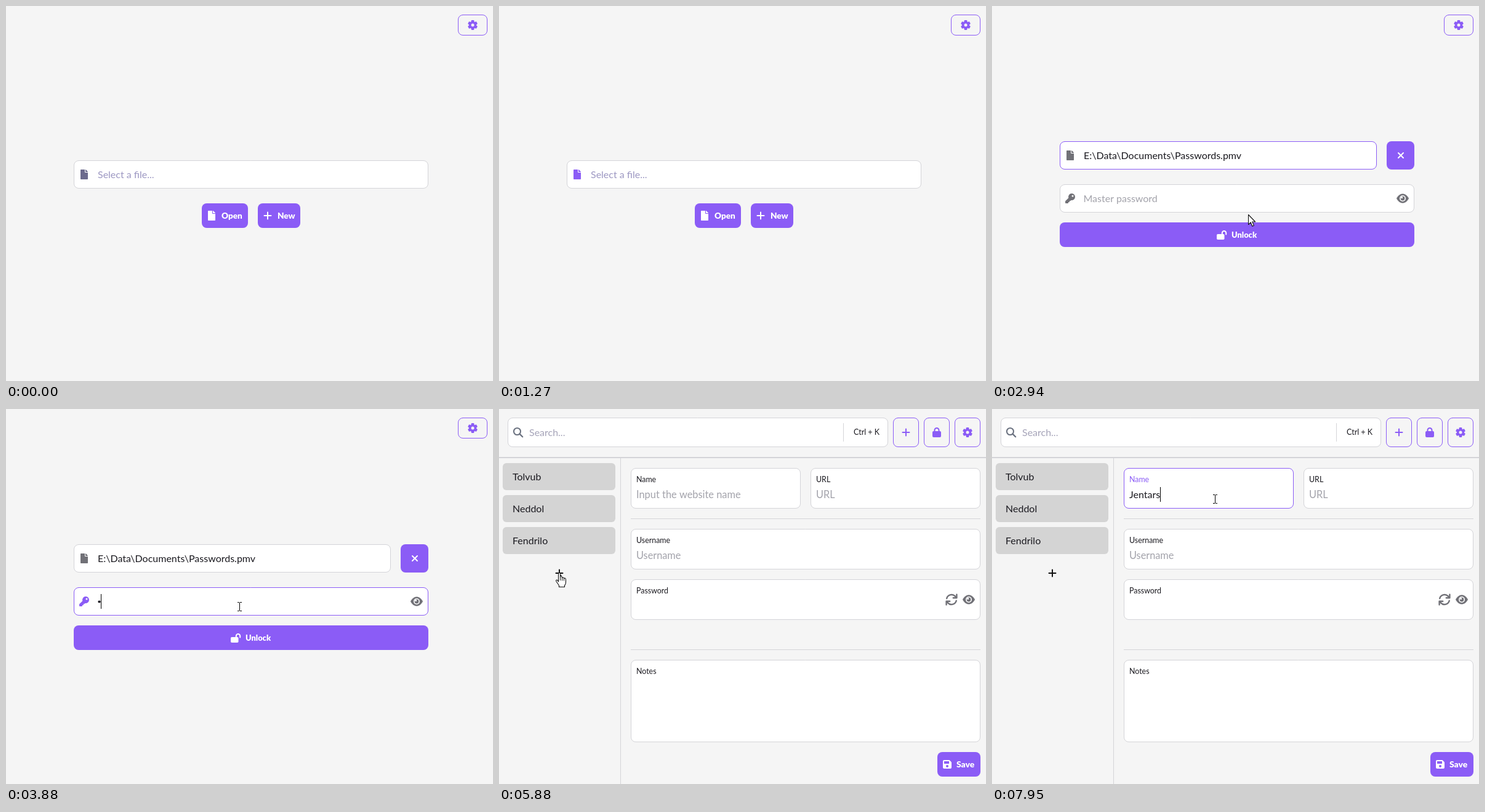
Animation of 791x610 px, one loop 8 s. Source, as an HTML page with a canvas:

```html
<!DOCTYPE html>
<html lang="en">
<head>
<meta charset="utf-8">
<title>Password vault</title>
<style>
html, body { margin: 0; width: 100%; height: 100%; overflow: hidden; background: #f5f5f5; }
canvas { display: block; width: 791px; height: 610px; }
</style>
</head>
<body>
<canvas id="stage"></canvas>
<script>
const LOOP = 8000, STEP = 66.8, W = 791, H = 610;
const BG = '#f5f5f5', PURPLE = '#8b5cf6', LINE = '#d4d4d8', INK = '#1b1a20';
const GRAY = '#717177', HINT = '#a3a3ab', WHITE = '#fff';
const canvas = document.getElementById('stage');
const g = canvas.getContext('2d');
const dpr = window.devicePixelRatio || 1;
canvas.width = W * dpr;
canvas.height = H * dpr;

const FILE = new Path2D('M224 136V0H24C11 0 0 11 0 24v464c0 13 11 24 24 24h336c13 0 24-11 24-24V160H248c-13 0-24-11-24-24zm160-14v6H256V0h6c6 0 13 3 17 7l98 98c5 4 7 11 7 17z');
const KEY = new Path2D('M512 176A176 176 0 0 1 303 349l-24 27a24 24 0 0 1-18 8h-37v40a24 24 0 0 1-24 24h-40v40a24 24 0 0 1-24 24H24a24 24 0 0 1-24-24v-78a24 24 0 0 1 7-17l162-162A176 176 0 1 1 512 176zM336 128a48 48 0 1 0 96 0a48 48 0 1 0-96 0z');
const ARROW = new Path2D('M.5.5V16.5L4.2 13 6.8 19.2 9.4 18.1 6.8 12H11.6Z');
const HAND = new Path2D('M-1.5 14V1.5Q-1.5-.5 0-.5T1.5 1.5V7Q2-.0 4.5 7.5Q6.5 6 7.5 8.5Q10.5 7 10.5 11V15Q10.5 18 8.5 20V22.5H-.5V20L-5 13.5Q-6 11-4 11Q-2.8 11-1.5 14');

function text(s, x, y, color = INK, size = 16, weight = 400) {
  g.font = `${weight} ${size}px Lato, "Open Sans", sans-serif`;
  g.fillStyle = color;
  g.fillText(s, x, y);
}

function fillBox(x, y, w, h, r, color) {
  g.fillStyle = color;
  g.beginPath();
  g.roundRect(x, y, w, h, r);
  g.fill();
}

function outline(x, y, w, h, border = LINE, fill = WHITE) {
  g.beginPath();
  g.roundRect(x + .5, y + .5, w - 1, h - 1, 7.5);
  g.fillStyle = fill;
  g.fill();
  g.strokeStyle = border;
  g.lineWidth = 1;
  g.stroke();
}

function rect(x, y, w, h, color) {
  g.fillStyle = color;
  g.fillRect(x, y, w, h);
}

function disc(x, y, r, color) {
  g.fillStyle = color;
  g.beginPath();
  g.arc(x, y, r, 0, Math.PI * 2);
  g.fill();
}

function stroke(path, color, width, cap = 'round') {
  g.strokeStyle = color;
  g.lineWidth = width;
  g.lineCap = cap;
  g.lineJoin = 'round';
  g.stroke(new Path2D(path));
}

function glyph(path, x, y, color) {
  g.save();
  g.translate(x, y);
  g.scale(1 / 32, 1 / 32);
  g.fillStyle = color;
  g.fill(path, 'evenodd');
  g.restore();
}

function plus(x, y, color) {
  const r = 5.5;
  stroke(`M${x - r} ${y}H${x + r}M${x} ${y - r}V${y + r}`, color, 2);
}

function gear(x, y) {
  g.save();
  g.translate(x, y);
  disc(0, 0, 6, PURPLE);
  for (let i = 0; i < 3; i++) {
    fillBox(-2.4, -8, 4.8, 16, 1.3, PURPLE);
    g.rotate(Math.PI / 3);
  }
  disc(0, 0, 2.5, BG);
  g.restore();
}

function eye(x, y) {
  g.fillStyle = GRAY;
  g.fill(new Path2D(`M${x - 10} ${y}C${x - 5} ${y - 10} ${x + 5} ${y - 10} ${x + 10} ${y}C${x + 5} ${y + 10} ${x - 5} ${y + 10} ${x - 10} ${y}Z`));
  disc(x, y, 5, WHITE);
  disc(x, y, 3.4, GRAY);
  disc(x - 1.4, y - 1.4, 1.5, WHITE);
}

function refresh(x, y) {
  g.save();
  g.translate(x, y);
  for (let i = 0; i < 2; i++) {
    stroke('M-7.8-1.8A8 8 0 0 1 5.7-5.6L8-3.2', GRAY, 2.4);
    stroke('M8.4-8.4V-2.8H2.8', GRAY, 2.4);
    g.rotate(Math.PI);
  }
  g.restore();
}

function lock(x, y) {
  fillBox(x - 7, y - 2, 14, 10, 2, PURPLE);
  stroke(`M${x - 3.5} ${y - 1}V${y - 3.5}A3.5 3.5 0 0 1 ${x + 3.5} ${y - 3.5}V${y - 1}`, PURPLE, 2, 'butt');
}

function startView(t) {
  outline(734, 14, 48, 34, PURPLE, BG);
  gear(758, 31);
  outline(110, 251, 576, 46);
  glyph(FILE, 121, 266, t >= 735 ? PURPLE : '#6c6b8d');
  text('Select a file...', 149, 280, '#9c97c2');
  fillBox(318, 321, 75, 40, 8, PURPLE);
  glyph(FILE, 328, 333, WHITE);
  text('Open', 350, 346, WHITE, 13.6, 900);
  fillBox(409, 321, 69, 40, 8, PURPLE);
  plus(425, 341, WHITE);
  text('New', 441, 346, WHITE, 13.6, 900);
}

const count = (times, t) => times.filter(k => t >= k).length;

function unlockView(t) {
  const focus = t >= 3150;
  const dots = count([3880, 3945, 4010, 4220, 4480, 4545, 4610, 4680], t);
  outline(734, 14, 48, 34, PURPLE, BG);
  gear(758, 31);
  outline(110, 220, 515, 46, t >= 2480 && !focus ? PURPLE : LINE);
  glyph(FILE, 121, 235, GRAY);
  text('E:\\Data\\Documents\\Passwords.pmv', 149, 249);
  fillBox(641, 220, 45, 46, 8, PURPLE);
  stroke('M660 239l8 8m0-8l-8 8', WHITE, 2);

  outline(110, 290, 576, 46, focus ? PURPLE : LINE);
  glyph(KEY, 119, 305, t >= 3000 ? PURPLE : GRAY);
  if (!dots) text('Master password', 148.5, 319, HINT);
  for (let i = 0; i < dots; i++) disc(151.5 + i * 6.05, 313.5, 2.1, INK);
  if (focus && (t < 3680 || dots)) rect(Math.round(148 + dots * 6.05), 301, 1, 24, '#000');
  eye(667, 313);

  fillBox(110, 352, 576, 40, 8, PURPLE);
  fillBox(365, 371, 12.5, 9, 1.8, WHITE);
  stroke('M373.8 372V369.3A3.2 3.2 0 0 1 380.2 369.3V371.5', WHITE, 2);
  text('Unlock', 389, 377, WHITE, 12.9, 900);
}

function field(label, hint, x, y, w, h) {
  outline(x, y, w, h);
  text(label, x + 9, y + 23, INK, 12.4);
  if (hint) text(hint, x + 9, y + 49, HINT, 16.3);
}

function form(t) {
  const focus = t >= 6550;
  const typed = 'Jentars'.slice(0, count([7290, 7350, 7490, 7550, 7690, 7820, 7950], t));
  outline(214, 96, 276, 66, focus ? PURPLE : LINE);
  text('Name', 223, 119, t >= 6280 ? PURPLE : INK, 12.4);
  text(typed || 'Input the website name', 223, 145, typed ? INK : HINT, typed ? 16 : 16.4);
  if (focus && (t < 7080 || typed)) {
    const w = typed ? g.measureText(typed).width : 0;
    rect(Math.round(223 + w), 127, 1, 24, '#000');
  }
  field('URL', 'URL', 506, 96, 276, 66);
  rect(214, 178, 568, 1, LINE);
  field('Username', 'Username', 214, 195, 568, 66);
  field('Password', '', 214, 277, 568, 66);
  refresh(735, 310);
  eye(763, 310);
  rect(214, 391, 568, 1, LINE);
  field('Notes', '', 214, 408, 568, 134);

  fillBox(712, 558, 70, 40, 8, PURPLE);
  g.fillStyle = WHITE;
  g.fill(new Path2D('M723 571h8.5l3.5 3.5V583a2 2 0 0 1-2 2H723a2 2 0 0 1-2-2V573a2 2 0 0 1 2-2z'));
  rect(723, 573, 8, 4, PURPLE);
  disc(728, 581, 2, PURPLE);
  text('Save', 743, 583, WHITE, 13.9, 900);
}

function vaultView(t) {
  outline(14, 14, 618, 48);
  stroke('M33.6 40.6L38.2 45.2', '#6b7280', 2.3);
  stroke('M35 36.5A5.5 5.5 0 1 1 24 36.5A5.5 5.5 0 1 1 35 36.5', '#6b7280', 2.1);
  text('Search...', 49, 44, '#a5a3b8');
  rect(559, 23, 1, 30, LINE);
  text('Ctrl + K', 576, 42, INK, 12.5);
  for (const x of [640, 690, 740]) outline(x, 14, 42, 48, PURPLE, BG);
  plus(661, 38, PURPLE);
  lock(711, 38);
  gear(761, 38);
  rect(0, 78, W, 2, LINE);
  rect(197, 80, 1, 530, LINE);
  ['Tolvub', 'Neddol', 'Fendrilo'].forEach((name, i) => {
    fillBox(6, 88 + i * 52, 183, 44, 6, '#d4d4d4');
    text(name, 22, 116 + i * 52);
  });
  plus(98, 267, '#111');
  if (t >= 5880) form(t);
}

// Pointer moves: start, end, from, to, shape, easing power
const MOVES = [
  [66, 801, 733, 598, 376, 273, 'arrow', 1.7],
  [1002, 1202, 376, 273, 740, 337, 'arrow', 1],
  [2670, 2738, 735, 405, 560, 388, 'arrow', 1],
  [2738, 3073, 560, 388, 373, 324, 'arrow', 1.6],
  [3273, 3400, 373, 324, 379, 321, 'beam', 1],
  [4900, 5411, 377, 320, 377, 320, 'arrow', 1],
  [5411, 5811, 377, 320, 98, 267, 'arrow', 1.6],
  [5878, 6279, 98, 267, 346, 163, 'arrow', 1.6],
  [6279, 6412, 346, 163, 362, 146, 'beam', 1]
];

function shapeAt(x, y, t, shape) {
  const inside = (l, top, r, b) => x >= l && x <= r && y >= top && y <= b;
  if (t < 1070) return inside(110, 251, 686, 297) || inside(318, 321, 393, 361) || inside(409, 321, 478, 361) ? 'hand' : shape;
  if (t >= 2670 && t < 4900) {
    if (inside(110, 352, 686, 392)) return 'hand';
    if (inside(110, 290, 650, 336)) return 'beam';
  }
  if (t >= 5480) {
    if (inside(80, 255, 116, 280)) return 'hand';
    if (t >= 5880 && (inside(214, 96, 490, 162) || inside(214, 195, 782, 261))) return 'beam';
  }
  return shape;
}

function pointer(t) {
  if (t < 70 || (t >= 1270 && t < 2670)) return;
  const q = Math.floor(t / STEP + .02) * STEP;
  const [a, b, x0, y0, x1, y1, base, pow] = MOVES.filter(m => t >= m[0]).pop();
  const p = Math.min(1, Math.max(0, (q - a) / (b - a)));
  const e = 1 - (1 - p) ** pow;
  const x = Math.round(x0 + (x1 - x0) * e), y = Math.round(y0 + (y1 - y0) * e);
  const shape = shapeAt(x, y, t, base);
  g.save();
  g.translate(x, y);
  if (shape === 'beam') {
    stroke('M-3-6.5H0M1-6.5H4M-3 7.5H0M1 7.5H4M.5-6V7', '#000', 1, 'butt');
  } else {
    const path = shape === 'hand' ? HAND : ARROW;
    g.fillStyle = WHITE;
    g.fill(path);
    g.strokeStyle = '#111';
    g.lineWidth = 1.1;
    g.lineJoin = 'round';
    g.stroke(path);
    if (shape === 'hand') stroke('M1.5 7V11.5M4.5 8V12M7.5 9V12', '#111', 1);
  }
  g.restore();
}

function draw() {
  const t = performance.now() % LOOP;
  g.setTransform(dpr, 0, 0, dpr, 0, 0);
  rect(0, 0, W, H, BG);
  if (t < 2410) startView(t);
  else if (t < 4900) unlockView(t);
  else vaultView(t);
  pointer(t);
  requestAnimationFrame(draw);
}
draw();
</script>
</body>
</html>
```
